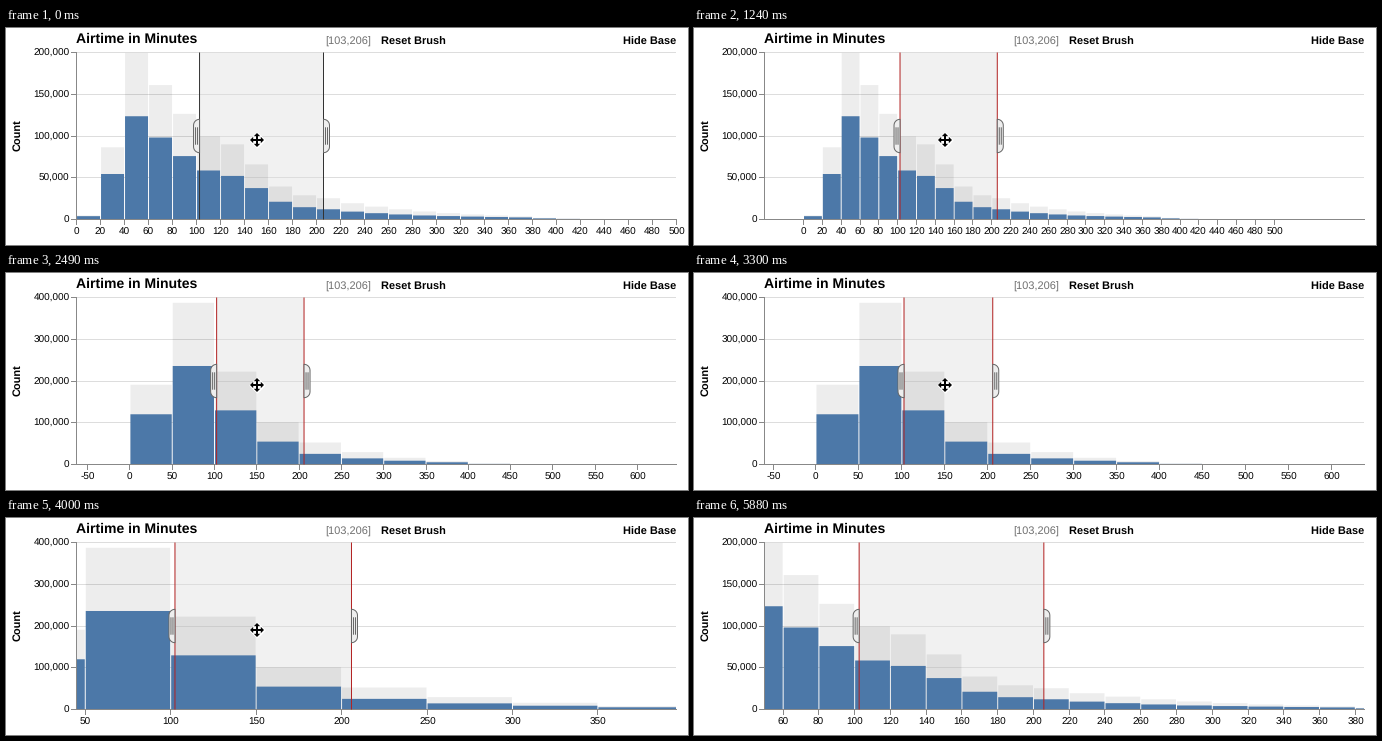
Write a matplotlib script that moves like this. It is 682x217 px and loops after 6.43 s.

```python
import math

import matplotlib.pyplot as plt
import numpy as np
from matplotlib.animation import FuncAnimation
from matplotlib.collections import LineCollection, PolyCollection

W, H, DPI = 682, 217, 64
PX = 72 / DPI                      # points per pixel
LOOP, FRAMES = 6430, 321
STEP = LOOP / FRAMES

LEFT, RIGHT, TOP, BASE = 70, 670, 24.5, 191.5
ANCHOR_X, ANCHOR = 251, 150.8      # zoom keeps this value under the pointer
BRUSH = (102.5, 205.8)
BLUE, RED, GRAY = "#4c78a8", "#b22222", "#888888"
WIDE, FAR, NEAR = np.log([1.2, .846, 1.788])   # pixels per minute


def curve(x, points):
    """Exponential interpolation through (x, value) points."""
    px, py = zip(*points)
    return np.exp(np.interp(x, px, np.log(py)))


# Flights in thousands per 20 minute bin, and the share that passes the filter
BINS = np.arange(25)
ALL = curve(BINS, [(0, 4.8), (1, 86.5), (2, 199.5), (3, 161), (5, 99.5),
                   (6, 90), (7, 66), (8, 39.5), (9, 29), (10, 25.5),
                   (11, 19.5), (18, 3.8), (20, 1), (24, .3)])
SHARE = curve(BINS, [(0, .83), (1, .63), (4, .6), (7, .57), (10, .48),
                     (14, .5), (18, .66), (24, .8)])


def histogram(counts, size):
    edges = np.arange(0, 500 + size, size)
    total = np.concatenate([[0], np.cumsum(counts)])
    return np.diff(np.interp(edges, np.arange(26) * 20, total))


def ease(t, start, steps, n, m, c):
    """Stepped S-curve; n and m shape its two ends, c its balance."""
    k = math.floor((t - start) / 87.5) + 1
    u = min(max(k / steps, 0), 1)
    return u ** n / (u ** n + c * (1 - u) ** m)


def scale_at(t):
    out = ease(t, 800, 11, 2.69, 2.69, .72)
    back = ease(t, 3300, 13, 2.63, .76, .06)
    return math.exp(WIDE + (FAR - WIDE) * out + (NEAR - FAR) * back)


def cursor_at(t):
    if t < 5790:
        return 251, 112
    return (356, 147) if t < 5880 else None


def bars(counts, size, top, to_x):
    polys = []
    for i, n in enumerate(counts):
        a, b = np.clip([to_x(i * size) + 1, to_x((i + 1) * size)], LEFT, RIGHT)
        if b > a:
            y = BASE - (BASE - TOP) * n / top
            polys.append([(a, BASE), (a, y), (b, y), (b, BASE)])
    return polys


def handle(x, side):
    top, bottom, r = 91.3, 124.7, 6
    a = np.linspace(0, math.pi / 2, 8)
    dx, dy = side * r * np.sin(a), r * (1 - np.cos(a))
    upper = np.column_stack([x + dx, top + dy])
    lower = np.column_stack([x + dx, bottom - dy])[::-1]
    return np.vstack([upper, lower])


def move_icon(x, y):
    arm = np.array([(-1, -1), (-1, -3.8), (-3.2, -3.8), (0, -7),
                    (3.2, -3.8), (1, -3.8)])
    pts = []
    for _ in range(4):
        pts.append(arm)
        arm = np.column_stack([-arm[:, 1], arm[:, 0]])
    return np.vstack(pts) + (x, y)


plt.rcParams["font.family"] = "Liberation Sans"
plt.rcParams["text.hinting"] = "no_hinting"
fig = plt.figure(figsize=(W / DPI, H / DPI), dpi=DPI, facecolor="white")
ax = fig.add_axes([0, 0, 1, 1])
ax.set_xlim(0, W)
ax.set_ylim(H, 0)
ax.set_axis_off()


def text(x, y, s, size=10, **kw):
    return ax.text(x, y, s, fontsize=size * PX, **kw)


def polys(z, **kw):
    return ax.add_collection(
        PolyCollection([], zorder=z, snap=False, **kw), autolim=False)


def lines(z, color, segments=()):
    return ax.add_collection(
        LineCollection(list(segments), colors=color, linewidths=PX,
                       zorder=z, snap=False, capstyle="butt"), autolim=False)


text(70, 15, "Airtime in Minutes", 14, weight="bold")
text(365.5, 17, "[103,206]", 11, color="#707070", ha="right")
text(375, 17, "Reset Brush", 11, weight="bold")
text(670, 17, "Hide Base", 11, weight="bold", ha="right")
text(12, 107.5, "Count", 11, weight="bold", rotation=90, ha="center",
     va="center")

levels = [math.floor(BASE - (BASE - TOP) * i / 4) + .5 for i in range(5)]
lines(2, "#dddddd", [[(LEFT, y), (RIGHT, y)] for y in levels])
lines(5, GRAY, [[(65, y), (LEFT, y)] for y in levels]
      + [[(70.5, 24), (70.5, 192)], [(LEFT, BASE), (671, BASE)]])
y_labels = [text(63.5, y + 3.5, "", ha="right") for y in levels]
x_labels = [text(0, 207, "", ha="center") for _ in range(30)]

shade = polys(1, facecolors=(0, 0, 0, .055), linewidths=0)
base_bars = polys(3, facecolors=(0, 0, 0, .07), linewidths=0)
blue_bars = polys(4, facecolors=BLUE, linewidths=0)
x_ticks = lines(5, GRAY)
edges = lines(6, "#333333")
handles = polys(7, facecolors="#eeeeee", edgecolors="#666666", linewidths=PX)
grips = lines(8, "#666666")
halo = polys(9, facecolors="white", edgecolors="white", linewidths=2 * PX)
pointer = polys(10, facecolors="black", linewidths=0)


def draw_axis(s, size, to_x):
    ticks = range(0, 501, 20) if size == 20 else range(-100, 701, 50)
    ticks = [v for v in ticks if LEFT - .5 <= to_x(v) <= RIGHT + .5]
    xs = [round(to_x(v)) + .5 for v in ticks]
    x_ticks.set_segments([[(x, 192), (x, 197)] for x in xs])

    # Crowded labels: keep every second one
    every = 2 * size if size * s < 18 else size
    shown = [(x, v) for x, v in zip(xs, ticks) if v % every == 0]
    for i, label in enumerate(x_labels):
        label.set_visible(i < len(shown))
        if i < len(shown):
            label.set_x(shown[i][0])
            label.set_text(str(shown[i][1]))


def draw(i):
    t = (i + 1) * STEP
    s = scale_at(t)
    size, top = (50, 400) if 2490 <= t < 5160 else (20, 200)

    def to_x(v):
        return ANCHOR_X + (v - ANCHOR) * s

    draw_axis(s, size, to_x)
    for k, label in enumerate(y_labels):
        label.set_text(f"{top * 250 * k:,}")

    base_bars.set_verts(bars(histogram(ALL, size), size, top, to_x))
    blue_bars.set_verts(bars(histogram(ALL * SHARE, size), size, top, to_x))

    a, b = (to_x(v) + .5 for v in BRUSH)
    shade.set_verts([[(a, TOP), (b, TOP), (b, BASE), (a, BASE)]])
    edges.set_segments([[(x, TOP), (x, BASE)] for x in (a, b)])
    edges.set_color("#333333" if t < 800 else RED)
    handles.set_verts([handle(a, -1), handle(b, 1)])
    grips.set_segments([[(x, 99.3), (x, 116.7)]
                        for x in (a - 4, a - 2, b + 2, b + 4)])

    spot = cursor_at(t)
    icon = [move_icon(*spot)] if spot else []
    halo.set_verts(icon)
    pointer.set_verts(icon)
    return []


anim = FuncAnimation(fig, draw, frames=FRAMES, interval=STEP, repeat=True,
                     repeat_delay=0, init_func=lambda: draw(0), blit=False,
                     cache_frame_data=False)
plt.show()
```
